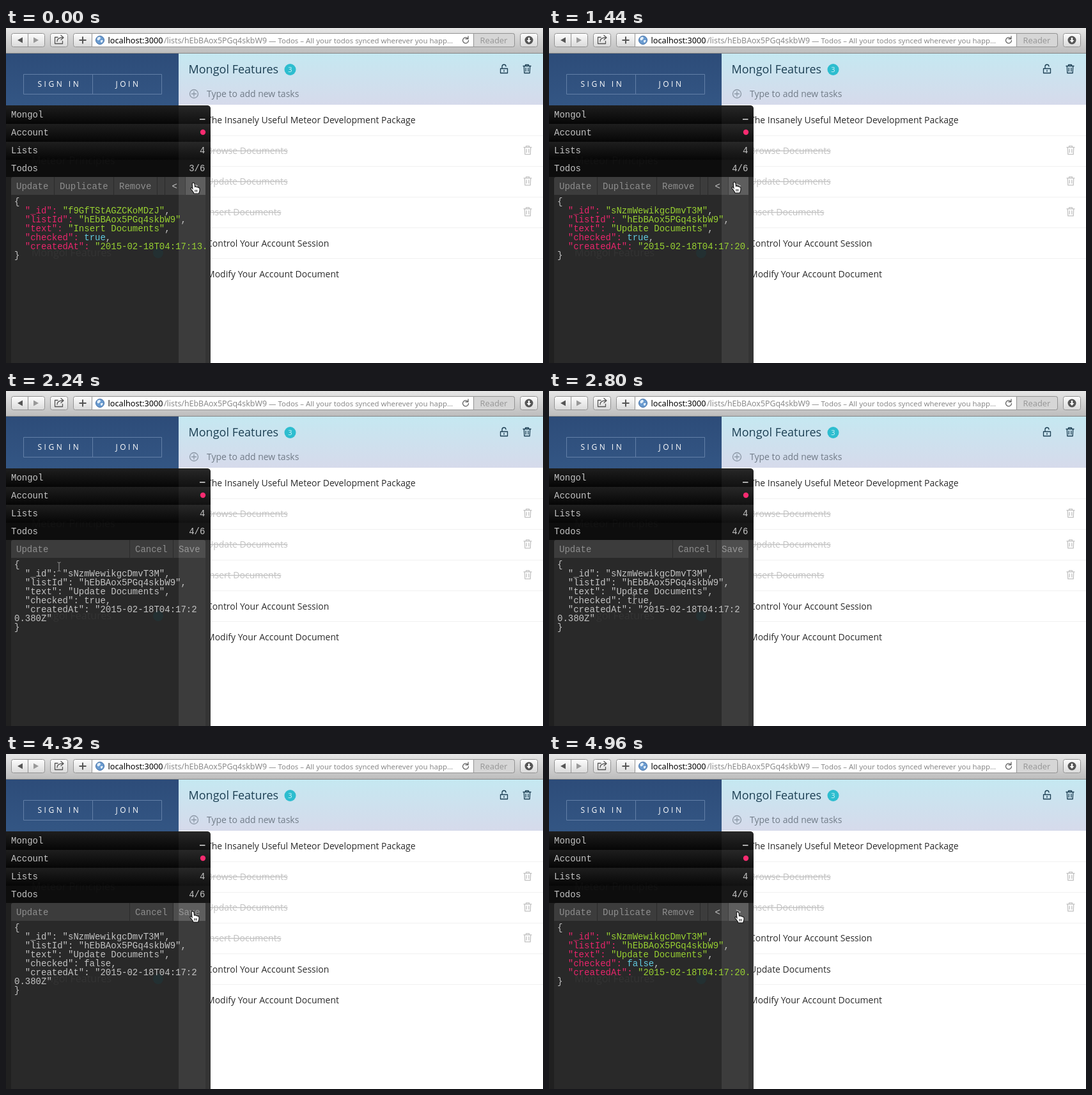
Write an HTML page that moves like this. It is 840x524 px and loops after 5.28 s.

```html
<!DOCTYPE html>
<html lang="en">
<head>
<meta charset="utf-8">
<title>Todos</title>
<style>
html, body { margin: 0; width: 100%; height: 100%; overflow: hidden; background: #fff; }
svg { display: block; width: 840px; height: 524px; }
text { white-space: pre; font: 14px "Open Sans", sans-serif; }
.chrome text { font-family: "Noto Sans", sans-serif; }
.mono text { font-family: "Liberation Mono", monospace; fill: #c4c4c4; }
.mono .button { fill: #8e8e8e; }
.mono .ghost { font: 16px "Open Sans", sans-serif; fill: #fff; opacity: .045; }
.key { fill: #ea256c; }
.string { fill: #98d132; }
.bool { fill: #62cbe0; }
.line { fill: none; stroke-width: 1.3; stroke-linecap: round; stroke-linejoin: round; }
</style>
</head>
<body>
<svg viewBox="0 0 840 524">
  <defs>
    <linearGradient id="toolbar" x2="0" y2="1"><stop stop-color="#e6e6e6"/><stop offset="1" stop-color="#bcbcbc"/></linearGradient>
    <linearGradient id="key" x2="0" y2="1"><stop stop-color="#fdfdfd"/><stop offset="1" stop-color="#dadada"/></linearGradient>
    <linearGradient id="side" x2="0" y2="1"><stop stop-color="#2d4c79"/><stop offset="1" stop-color="#345785"/></linearGradient>
    <linearGradient id="header" x2="0" y2="1"><stop stop-color="#c5e8f1"/><stop offset="1" stop-color="#d6daeb"/></linearGradient>
    <linearGradient id="row" x2="0" y2="1"><stop stop-color="#1e1e1e"/><stop offset="1" stop-color="#060606"/></linearGradient>
    <g id="trash" class="line">
      <path d="M-6-4.5H6M-2.5-4.5v-2h5v2M-4.7-4.5l.5 11h8.4l.5-11M-1.8-1.5v5M1.8-1.5v5"/>
    </g>
  </defs>

  <g class="chrome">
    <path fill="url(#toolbar)" d="M0 0h840v40H0z"/>
    <path fill="#858585" d="M0 39h840v1H0z"/>
    <g fill="url(#key)" stroke="#929292">
      <rect x="8.5" y="8.5" width="52" height="21" rx="3"/>
      <rect x="69.5" y="8.5" width="27" height="21" rx="3"/>
      <rect x="105.5" y="8.5" width="690" height="21" rx="3"/>
      <rect x="804.5" y="8.5" width="27" height="21" rx="3"/>
      <path fill="#fff" d="M134.5 8.5h597v21h-597z"/>
      <path d="M34.5 9v20"/>
    </g>
    <path fill="#555" d="M18 19l8-4.5v9z"/>
    <path fill="#999" d="M51 19l-8-4.5v9z"/>
    <path class="line" stroke="#555" d="M81 14.5h-4.5v10h12v-4M80 21c0-4 3-6 9-6m-3-3.5 4 3.500-4 3.500"/>
    <path stroke="#555" stroke-width="2" d="M114.500 19h11M120 13.500v11"/>
    <circle cx="147" cy="19" r="6.500" fill="#6a9bd0" stroke="#3f6ca3"/>
    <path fill="#e2eef8" d="M143 15l4-1.500 1 3-3 3-2.500-1zM148 19l4 0-2 4-2-1z"/>
    <text x="159.500" y="23.500" style="font-size:12.700px">localhost:3000</text>
    <g fill="#8a8a8a">
      <text x="247" y="23.500" style="font-size:12.400px">/lists/hEbBAox5PGq4skbW9</text>
      <text x="411" y="23.500" style="font-size:11.450px">— Todos – All your todos synced wherever you happ…</text>
    </g>
    <path class="line" stroke="#666" stroke-width="1.800" d="M722.500 16.500a4.500 4.500 0 1 0 1 3M723 13v4h-4"/>
    <path fill="#d6d6d6" stroke="#929292" d="M731.500 8.500h61q3 0 3 3v15q0 3-3 3h-61z"/>
    <text x="741.500" y="23.500" fill="#999" style="font-size:12.850px">Reader</text>
    <circle cx="818" cy="19" r="6.500" fill="#555"/>
    <path fill="#fff" d="M816.800 15h2.400v4h2.300l-3.500 4-3.500-4h2.300z"/>
  </g>

  <path fill="url(#side)" d="M0 40h270v90H0z"/>
  <path fill="none" stroke="#627fa7" d="M27.500 72.500h216v31h-216zM135.500 72.500v31"/>
  <g fill="#fff" letter-spacing="3.500">
    <text x="49.500" y="92" style="font-size:12px">SIGN IN</text>
    <text x="171.500" y="92" style="font-size:12px">JOIN</text>
  </g>

  <path fill="url(#header)" d="M270 40h570v80H270z"/>
  <text x="285.500" y="71" fill="#1c3f53" style="font-size:18px">Mongol Features</text>
  <circle cx="444.500" cy="65" r="9" fill="#2dbdcf"/>
  <text x="444.500" y="69" fill="#d5f5f9" text-anchor="middle" style="font-size:11px">3</text>
  <g class="line" stroke="#1c3f53">
    <path d="M773.500 63.500h11v7h-11zM776 63v-2.500a3 3 0 0 1 6-.5M779 66v2"/>
    <use href="#trash" x="815" y="64"/>
  </g>
  <g class="line" stroke="#8b97a5"><circle cx="294" cy="103" r="6.500"/><path d="M290.500 103h7M294 99.500v7"/></g>
  <text x="314" y="108" fill="#717c88">Type to add new tasks</text>

  <g id="tasks"></g>

  <g class="mono">
    <path fill="#202020" d="M0 121h314q6 0 6 6v397H0z"/>
    <path fill="#292929" d="M8 261h304v263H8z"/>
    <path fill="url(#row)" d="M0 121h314q6 0 6 6v23H0z"/>
    <path fill="url(#row)" d="M0 150h320v28H0z"/>
    <path fill="url(#row)" d="M0 178h320v28H0z"/>
    <path fill="#0d0d0d" d="M0 206h320v27H0z"/>
    <path fill="#fff" opacity=".045" d="M270 121h44q6 0 6 6v106h-50z"/>
    <text x="8" y="140">Mongol</text>
    <text x="8" y="168">Account</text>
    <text x="8" y="196">Lists</text>
    <text x="8" y="224">Todos</text>
    <path fill="#ddd" d="M303 142h8.500v1.500H303z"/>
    <circle cx="308" cy="163" r="4.200" fill="#fa2b70"/>
    <text x="303" y="196">4</text>
    <text id="position" x="286.200" y="224"></text>
    <g id="bar"></g>
    <path fill="#fff" opacity=".09" d="M270 233h50v291h-50z"/>
    <text class="ghost" x="40" y="213" fill-opacity=".5">Meteor Principles</text>
    <text class="ghost" x="40" y="357">Mongol Features</text>
    <circle cx="238" cy="352" r="8" fill="#1b3d42" opacity=".4"/>
    <g id="code"></g>
  </g>

  <path id="hand" fill="#fff" stroke="#111" stroke-width="1.100" d="M0-1c1.400 0 1.900 1 2 2l.5 4.500c1-.8 2.400-.5 2.800.4 1-.5 2.100-.2 2.500.8 1.400-.3 2.200.6 2.200 2v2.500c0 2-1.300 2.800-1.300 4.800H1C.8 13.500-3 10.800-4 8.200c-.4-1.700 1.500-1.900 3 .2L-1.700 1c-.1-1.100.4-2 1.700-2zM3 10v3.500M5.500 10v3.500"/>
  <path id="beam" fill="none" stroke="#999" d="M-2.500-7Q0-7 0-5.500Q0-7 2.500-7M0-5.500v11M-2.500 7Q0 7 0 5.500Q0 7 2.500 7"/>
</svg>
<script>
const LOOP = 5280, STEP = 80, CHAR = 8.4;
const NEXT = 240, EDIT = 2080, SELECT = 2960, TYPE = 3120, SAVE = 4480, REORDER = 4560;
const el = id => document.getElementById(id);

// time, x, y of the pointer's hot spot
const path = [
  [0, 293, 243], [240, 293, 243], [480, 290, 242], [1440, 290, 242],
  [1840, 58, 251], [2080, 58, 251], [2480, 129, 319], [2640, 132, 326],
  [3520, 145, 322], [3840, 274, 260], [4000, 292, 247],
  [4480, 292, 247], [4800, 295, 248], [LOOP, 295, 248]
];
const viewButtons = [
  ["Update", 8, 75, 16], ["Duplicate", 76, 168, 84], ["Remove", 169, 236, 177],
  ["&lt;", 249, 280, 259.5], ["&gt;", 281, 312, 292]
];
const editButtons = [["Cancel", 194, 261, 202], ["Save", 262, 312, 270]];
const insertDoc = { id: "f9GfTStAGZCKoMDzJ", name: "Insert Documents", seconds: "13." };
const updateDoc = { id: "sNzmWewikgcDmvT3M", name: "Update Documents", seconds: "20." };

function pointerAt(t) {
  const i = path.findIndex(p => p[0] > t);
  const [t0, x0, y0] = path[i - 1], [t1, x1, y1] = path[i];
  const u = (t - t0) / (t1 - t0), e = u * u * (3 - 2 * u);
  return [x0 + (x1 - x0) * e, y0 + (y1 - y0) * e];
}

function drawTasks(reordered) {
  const done = reordered ? ["Browse", "Insert"] : ["Browse", "Update", "Insert"];
  const tasks = [
    "The Insanely Useful Meteor Development Package",
    ...done.map(verb => verb + " Documents"),
    "Control Your Account Session",
    ...(reordered ? ["Update Documents"] : []),
    "Modify Your Account Document"
  ];
  el("tasks").innerHTML = tasks.map((task, i) => {
    const y = 144 + 48.15 * i, struck = i > 0 && i <= done.length;
    const style = struck ? 'fill="#c2c2c2" text-decoration="line-through"' : 'fill="#2b2b2b"';
    return (i < 5 ? `<path stroke="#f1f1f1" d="M270 ${168.5 + 48 * i}h570"/>` : "") +
      `<text x="314" y="${y + 5}" ${style}>${task}</text>` +
      (struck ? `<use href="#trash" x="816" y="${y - 1}" stroke="#c2c2c2"/>` : "");
  }).join("");
}

function drawBar(editing, x, y) {
  const buttons = editing ? editButtons : viewButtons;
  let out = '<path fill="#3c3c3c" d="M8 261v-25q0-3 3-3h298q3 0 3 3v25z"/>';
  if (editing) out += '<text class="button" x="16" y="252">Update</text>';
  for (const [label, left, right, textX] of buttons) {
    const hover = y > 233 && y < 262 && x >= left && x <= right;
    const arrow = label[0] === "&";
    if (hover) out += `<path fill="#4e4e4e" d="M${left} 233H${right}v28H${left}z"/>`;
    if (left > 8) out += `<path stroke="#2b2b2b" d="M${left - .5} 233v28"/>`;
    if (label === "Remove") out += '<path stroke="#2b2b2b" d="M236.5 233v28"/>';
    out += `<text class="${arrow ? "" : "button"}" x="${textX}" y="252" ${arrow ? 'font-weight="bold"' : ""}>${label}</text>`;
  }
  el("bar").innerHTML = out;
}

function drawCode(doc, value, editing, selected, caret) {
  const paint = (kind, s) => editing ? s : `<tspan class="${kind}">${s}</tspan>`;
  const field = (name, kind, s, end = ",") =>
    `  ${paint("key", `"${name}":`)} ${paint(kind, s)}${end}`;
  const date = '"2015-02-18T04:17:' + doc.seconds;
  const lines = [
    "{",
    field("_id", "string", `"${doc.id}"`),
    field("listId", "string", '"hEbBAox5PGq4skbW9"'),
    field("text", "string", `"${doc.name}"`),
    field("checked", "bool", value),
    field("createdAt", "string", editing ? date.slice(0, -2) : date, ""),
    ...(editing ? ['0.380Z"'] : []),
    "}"
  ];
  const valueX = 13 + 13 * CHAR;
  let out = selected ? `<path fill="#496783" d="M${valueX} 320h${4 * CHAR}v14h-${4 * CHAR}z"/>` : "";
  out += lines.map((s, i) => `<text x="13" y="${276 + 14 * i}">${s}</text>`).join("");
  if (caret) out += `<path stroke="#ddd" d="M${valueX + value.length * CHAR + .5} 320v14"/>`;
  el("code").innerHTML = out;
}

function draw(t) {
  const editing = t >= EDIT && t < SAVE;
  const typed = t < TYPE ? "true" : "false".slice(0, 1 + Math.floor((t - TYPE) / 120));
  const [x, y] = pointerAt(t);
  const overText = y > 262;
  const typing = t >= TYPE && t < 3600;

  drawTasks(t >= REORDER);
  el("position").textContent = t < NEXT ? "3/6" : "4/6";
  drawBar(editing, x, y);
  drawCode(t < NEXT ? insertDoc : updateDoc, typed, editing,
    t >= SELECT && t < TYPE, t >= TYPE && t < 4080);

  el("hand").setAttribute("visibility", overText ? "hidden" : "visible");
  el("beam").setAttribute("visibility", overText && !typing ? "visible" : "hidden");
  for (const id of ["hand", "beam"]) el(id).setAttribute("transform", `translate(${x} ${y})`);
}

let shown = -1;
function tick() {
  const t = Math.floor(performance.now() % LOOP / STEP) * STEP;
  if (t !== shown) draw(shown = t);
  requestAnimationFrame(tick);
}
tick();
</script>
</body>
</html>
```
